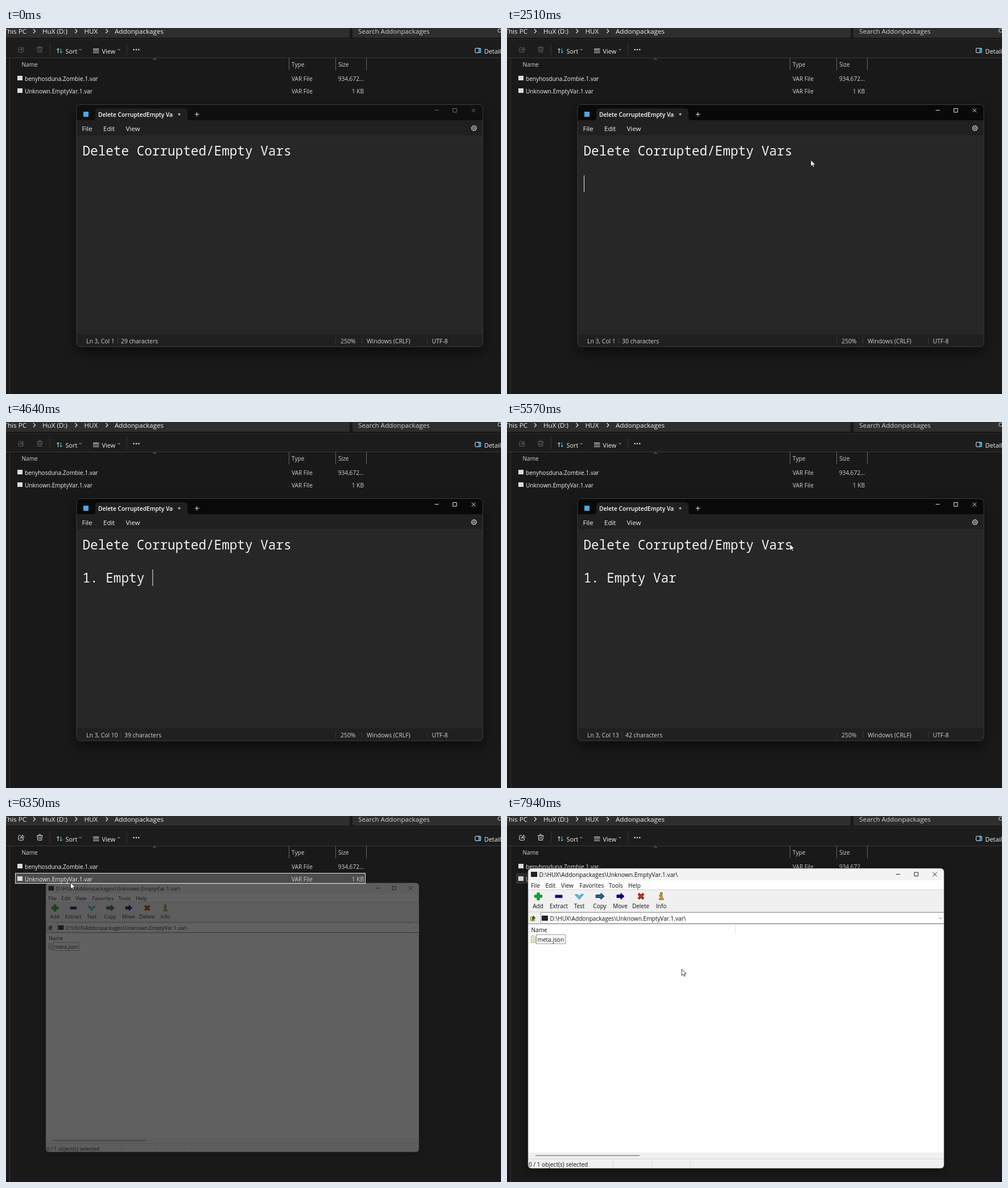
These frames come from a looping animation (870x643 px, 8 s). An HTML page:

```html
<!DOCTYPE html>
<html lang="en">
<head>
<meta charset="utf-8">
<title>Deleting empty packages</title>
<style>
html, body { margin: 0; width: 100%; height: 100%; overflow: hidden; background: #191919; }
svg { display: block; width: 870px; height: 643px; }
text { font: 10.1px "Open Sans", "Noto Sans", sans-serif; white-space: pre; }
.dark text { fill: #f2f2f2; }
.dark .soft { fill: #d2d2d2; }
.light text { fill: #111; }
.path text { font-size: 11.65px; }
.bar text { font-size: 10.9px; }
.menu text { font-size: 11.5px; }
.status text { font-size: 10.4px; }
.dark .tab { font-size: 10.2px; font-weight: 600; fill: #fff; }
.note { font: 22.67px "Noto Sans Mono", "DejaVu Sans Mono", monospace; }
.line { fill: none; stroke: #e6e6e6; }
.ink { fill: none; stroke: #222; }
.tools text { font-size: 10px; text-anchor: middle; }
#pad { filter: drop-shadow(0 9px 11px rgba(0, 0, 0, .5)); }
#zip { filter: drop-shadow(0 5px 9px rgba(0, 0, 0, .4)); }
</style>
</head>
<body>
<svg viewBox="0 0 870 643">
<defs>
  <clipPath id="padClip"><rect x="124" y="134" width="714" height="426" rx="7"/></clipPath>
  <clipPath id="zipClip"><rect x="37" y="92" width="731" height="527" rx="6"/></clipPath>
  <clipPath id="tabClip"><rect x="160" y="142" width="134" height="20"/></clipPath>
  <path id="arrow" d="M-6 -2.5H1V-5.5L7 0 1 5.5V2.5H-6Z"/>
</defs>

<g class="dark" id="explorer">
  <rect width="870" height="643" fill="#191919"/>
  <rect y="21" width="870" height="32" fill="#1c1c1c"/>
  <path d="M0 -4H604V14Q604 17 601 17H0ZM609 -4H870V17H612Q609 17 609 14Z" fill="#2e2e2e"/>
  <path d="M0 20.5H870" stroke="#292929"/>
  <path d="M0 52.5H870" stroke="#3a3a3a"/>
  <path d="M6.5 53V643" stroke="#363636"/>
  <g class="path">
    <text x="36" y="9.5" text-anchor="end">This PC</text>
    <text x="64" y="9.5">HuX (D:)</text>
    <text x="137.5" y="9.5">HUX</text>
    <text x="191" y="9.5">Addonpackages</text>
    <text x="619" y="9.5" class="soft">Search Addonpackages</text>
  </g>
  <path class="line" d="M48 2 51.5 5.5 48 9M121.5 2 125 5.5 121.5 9M175.500 2 179 5.5 175.500 9" stroke-width="1.2"/>
  <circle class="line" cx="867.5" cy="4.500" r="3"/>
  <g id="actions" fill="none">
    <path d="M26 34H23.500Q22 34 22 35.500V41Q22 42.500 23.500 42.500H29Q30.500 42.500 30.500 41V39.500M25 39.500Q25.500 36 28.500 36V33.500L32 36.500 28.500 39.500V37.500Q26 37.500 25 39.500Z"/>
    <path d="M54 34.500H64.500M57.500 34Q57.500 32 59.250 32T61 34M55 34.500 56 42.500H62.500L63.500 34.500M58 36.500V40.500M60.500 36.500V40.500"/>
  </g>
  <path d="M77.500 27V48M212.500 27V48" stroke="#333"/>
  <path class="line" d="M91.500 44V36M89 38.500 91.500 36 94 38.500"/>
  <path d="M96.500 36V44M94.500 41.500 96.500 44 99.500 41" fill="none" stroke="#5ab8ee"/>
  <path class="line" d="M153 36.500H163.500M153 38.500H163.500M153 41H163.500M153 43.500H163.500" stroke-width=".9"/>
  <path class="line" d="M128.500 37 130.500 39 132.500 37M196.500 37 198.500 39 200.500 37" stroke-width=".9"/>
  <g class="bar">
    <text x="104.500" y="44.500">Sort</text>
    <text x="168.500" y="44.500">View</text>
    <text x="840.500" y="44.500">Details</text>
  </g>
  <g fill="#eee"><circle cx="224.700" cy="38" r="1.200"/><circle cx="229" cy="38" r="1.200"/><circle cx="233.300" cy="38" r="1.200"/></g>
  <rect class="line" x="824.500" y="35.500" width="10" height="8" rx="1.500"/>
  <path d="M831 36H833.500Q834.500 36 834.500 37V42Q834.500 43.500 833.500 43.500H831Z" fill="#2d83c0" stroke="#62c1f5"/>
  <path d="M258.500 56 261 53.500 263.500 56" fill="none" stroke="#999"/>
  <path d="M497.500 53V74M579.500 53V74M633.500 53V74" stroke="#666"/>
  <text class="soft" x="27.500" y="68">Name</text>
  <text class="soft" x="502" y="68">Type</text>
  <text class="soft" x="584" y="68">Size</text>
  <rect id="row" x="16.500" y="100.500" width="615" height="18"/>
  <rect x="20" y="84" width="9" height="8" fill="#ddd"/>
  <rect x="20" y="106" width="9" height="8" fill="#ddd"/>
  <text x="33" y="92.500">benyhosduna.Zombie.1.var</text>
  <text x="33" y="114.500">Unknown.EmptyVar.1.var</text>
  <g>
    <text class="soft" x="502" y="92.500">VAR File</text>
    <text class="soft" x="502" y="114.500">VAR File</text>
    <text class="soft" x="629" y="92.500" text-anchor="end">934,672...</text>
    <text class="soft" x="629" y="114.500" text-anchor="end">1 KB</text>
  </g>
</g>

<g class="dark" id="pad">
  <g clip-path="url(#padClip)">
    <rect id="padTop" x="124" y="134" width="714" height="30"/>
    <path d="M153 162Q157 162 157 158V147Q157 141 163 141H313Q319 141 319 147V158Q319 162 323 162Z" fill="#202020"/>
    <rect x="124" y="162" width="714" height="27" fill="#202020"/>
    <rect x="124" y="189" width="714" height="349" fill="#272727"/>
    <rect x="124" y="538" width="714" height="22" fill="#202020"/>
    <path d="M124 189.500H838" stroke="#2c2c2c"/>
  </g>
  <rect x="124" y="134.500" width="714" height="425.500" rx="7" fill="none" stroke="#3d3d3d"/>
  <rect x="136" y="147" width="9" height="9" fill="#49a9e8"/>
  <g clip-path="url(#tabClip)"><text class="tab" x="162" y="156">Delete CorruptedEmpty Vars</text></g>
  <circle cx="304.500" cy="151.500" r="2" fill="#aaa"/>
  <path class="line" d="M332 151.500H339.500M335.500 148V155.500"/>
  <path id="padButtons" fill="none" d="M753.500 144.500H760.500M785.500 141.500H792V148H785.500ZM818.500 141.500 825 148M825 141.500 818.500 148"/>
  <g class="menu">
    <text x="133.500" y="181">File</text>
    <text x="171" y="181">Edit</text>
    <text x="210.500" y="181">View</text>
  </g>
  <g class="line"><circle cx="822.500" cy="176" r="1.500"/><circle cx="822.500" cy="176" r="3.900"/><circle cx="822.500" cy="176" r="4.600" stroke-dasharray="1.800 1.810"/></g>
  <text class="note" x="134.500" y="223.500">Delete Corrupted/Empty Vars</text>
  <text class="note" id="typed" x="134.500" y="282"></text>
  <path id="caret" d="M135.500 259V288" stroke="#eee"/>
  <g class="status">
    <text id="place" class="soft" x="141" y="554"></text>
    <g id="count">
      <path d="M196.500 544V555" stroke="#3a3a3a"/>
      <text id="chars" class="soft" x="202" y="554"></text>
    </g>
    <path d="M579.500 544V555M625.500 544V555M740.500 544V555" stroke="#3a3a3a"/>
    <text class="soft" x="588" y="554">250%</text>
    <text class="soft" x="634" y="554">Windows (CRLF)</text>
    <text class="soft" x="748.500" y="554">UTF-8</text>
  </g>
</g>

<g class="light" id="zip">
  <g clip-path="url(#zipClip)">
    <rect x="37" y="92" width="731" height="527" fill="#fff"/>
    <rect x="37" y="92" width="731" height="21" fill="#f3f3f3"/>
    <rect x="37" y="129" width="731" height="61" fill="#f0f0f0"/>
    <rect x="37" y="591" width="731" height="28" fill="#f0f0f0"/>
    <path d="M37 129.500H768M37 168.500H768M37 602.500H768" stroke="#d5d5d5"/>
    <path d="M186.500 604V619M254.500 604V619M322.500 604V619" stroke="#dcdcdc"/>
    <rect x="59.500" y="169.500" width="710" height="19.500" fill="#fff" stroke="#999"/>
    <path d="M37 189.500H768" stroke="#8a8a8a"/>
  </g>
  <rect x="42" y="98" width="11" height="9" fill="#222"/>
  <rect x="61" y="175" width="11" height="9" fill="#222"/>
  <text x="56.500" y="106.500" style="font-size:10.3px">D:\HUX\Addonpackages\Unknown.EmptyVar.1.var\</text>
  <text x="75.500" y="184">D:\HUX\Addonpackages\Unknown.EmptyVar.1.var\</text>
  <path class="ink" d="M683.500 102.500H691M716 99H722.500V105.500H716ZM748.500 99 755.500 106M755.500 99 748.500 106"/>
  <path d="M759.500 178.500 762 181 764.500 178.500" fill="none" stroke="#777"/>
  <text x="42" y="125.500">File</text><text x="67.500" y="125.500">Edit</text><text x="95" y="125.500">View</text>
  <text x="127.500" y="125.500">Favorites</text><text x="179" y="125.500">Tools</text><text x="213" y="125.500">Help</text>
  <rect id="copyHover" x="146" y="131" width="35" height="36" fill="#e3f0fb"/>
  <g class="tools">
    <text x="54.500" y="161.500">Add</text><text x="91" y="161.500">Extract</text><text x="127" y="161.500">Test</text>
    <text x="163" y="161.500">Copy</text><text x="199" y="161.500">Move</text><text x="235" y="161.500">Delete</text><text x="271" y="161.500">Info</text>
  </g>
  <path d="M53 135H57V139H61.500V143H57V147.500H53V143H48.500V139H53Z" fill="#0cb020" stroke="#063"/>
  <rect x="85" y="139" width="12" height="4.500" fill="#000098" stroke="#224"/>
  <path d="M119.500 138H124L127 141 130.500 137.500H134.500L127 146.500Z" fill="#49c8e8" stroke="#2b6a90" stroke-width=".8"/>
  <use href="#arrow" x="164" y="141" fill="#166c9c" stroke="#123"/>
  <path d="M156.500 138V144" stroke="#123" stroke-width="1.500"/>
  <use href="#arrow" x="199" y="141" fill="#000098" stroke="#113"/>
  <path d="M231 136.500 240 145.500M240 136.500 231 145.500" stroke="#501008" stroke-width="4"/>
  <path d="M231 136.500 240 145.500M240 136.500 231 145.500" stroke="#e03018" stroke-width="2.400"/>
  <path d="M269.500 134.500H273V137.500H269.500ZM268 139H273V145H275V147H267.500V145H269.500V141H268Z" fill="#e8ab20" stroke="#5c4108" stroke-width=".8"/>
  <path d="M41 177H44L45 178H49V184H41Z" fill="#eac545" stroke="#947515" stroke-width=".6"/>
  <path d="M43.500 183H46.500V178M44 179.500 46.500 175.500 49.500 179.500Z" fill="#265" stroke="#264a1c"/>
  <rect id="nameHover" x="38" y="191" width="364" height="17" fill="#d9ebf9"/>
  <path d="M401.500 191V208" stroke="#e2e2e2"/>
  <text x="42.500" y="204">Name</text>
  <path id="doc" d="M42.500 210.500H48L50.500 213V222.500H42.500Z" stroke="#999" stroke-width=".8"/>
  <path d="M44 214.500H48.500M44 217H49M44 219.500H49" stroke="#aaa" stroke-width=".7"/>
  <rect x="51.500" y="208.500" width="51" height="16" fill="none" stroke="#999"/>
  <text x="53.500" y="220.500">meta.json</text>
  <path d="M50 596.500H233" stroke="#858585" stroke-width="1.500"/>
  <text x="38" y="616">0 / 1 object(s) selected</text>
  <rect x="37" y="92" width="731" height="527" rx="6" fill="none" stroke="#777" stroke-opacity=".6"/>
</g>

<path id="cursor" d="M0 0V11.300L2.700 8.800 4.500 12.700 6.200 12 4.500 8.200H8Z" fill="#fff" stroke="#111" stroke-width=".8"/>
</svg>
<script>
const LOOP = 8000, BLINK = 530, PITCH = 13.6;
const LINE = "1. Empty Var";
const KEYS = [3040, 3300, 3370, 3640, 3980, 4180, 4380, 4440, 4640, 4710, 4910, 5040];
// time, x, y
const MOVES = [
  [300, 640, 430], [970, 560, 300], [1710, 537, 204], [1980, 534, 232],
  [5500, 534, 232], [5710, 425, 180], [5990, 114, 121], [6280, 113.5, 117],
  [6380, 113.5, 117], [6490, 165, 150], [6560, 207, 215],
  [6850, 140, 245], [7190, 90, 215], [7400, 130, 225], [7650, 217, 280], [7940, 307, 269]
];
const el = {};
document.querySelectorAll("[id]").forEach(n => el[n.id] = n);

const clamp = v => Math.max(0, Math.min(1, v));
const between = (t, a, b) => t >= a && t < b;
const show = (node, on) => node.setAttribute("visibility", on ? "visible" : "hidden");
const set = (node, attrs) => { for (const k in attrs) node.setAttribute(k, attrs[k]); };
const grey = v => `rgb(${v},${v},${v})`;

function position(t) {
  const i = MOVES.findIndex(m => m[0] > t);
  if (i === 0) return MOVES[0].slice(1);
  if (i < 0) return MOVES[MOVES.length - 1].slice(1);
  const [t0, x0, y0] = MOVES[i - 1], [t1, x1, y1] = MOVES[i];
  const k = (t - t0) / (t1 - t0);
  return [x0 + (x1 - x0) * k, y0 + (y1 - y0) * k];
}

function drawPad(t) {
  const n = KEYS.filter(k => k <= t).length;
  const focus = clamp((t - 130) / 200);
  const lastKey = n ? KEYS[n - 1] : 2510;
  el.pad.style.display = t < 6130 ? "" : "none";
  set(el.padTop, { fill: grey(Math.round(15 - 6 * focus)) });
  set(el.padButtons, { stroke: grey(Math.round(115 + 120 * focus)) });
  el.typed.textContent = LINE.slice(0, n);
  el.place.textContent = `Ln 3, Col ${n + 1}`;
  el.chars.textContent = `${(t < 970 ? 29 : 30) + n} characters`;
  set(el.count, { transform: `translate(${n > 8 ? 6 : 0})` });
  set(el.caret, { transform: `translate(${n * PITCH})` });
  show(el.caret, Math.floor((t - lastKey) / BLINK) % 2 === 0);
}

function drawExplorer(t) {
  const picked = t >= 6130, active = t < 6420;
  set(el.actions, { stroke: picked ? "#dce8f0" : "#646464" });
  set(el.row, { fill: active ? "#4d4d4d" : "#303030", stroke: active ? "#e0e0e0" : "#303030" });
  show(el.row, picked);
}

function drawZip(t) {
  const p = clamp((t - 6296) / 175), s = .85 + .15 * p;
  el.zip.style.display = p > 0 ? "" : "none";
  set(el.zip, { opacity: p, transform: `translate(358 340) scale(${s}) translate(-358 -340)` });
  show(el.copyHover, between(t, 6480, 6630));
  show(el.nameHover, between(t, 6520, 6700));
  set(el.doc, { fill: t < 7190 ? "#e4e4e4" : "#f2efc4" });
}

function frame() {
  const t = performance.now() % LOOP;
  drawExplorer(t);
  drawPad(t);
  drawZip(t);
  set(el.cursor, { transform: `translate(${position(t)})` });
  show(el.cursor, between(t, 300, 4180) || t >= 5500);
  requestAnimationFrame(frame);
}
frame();
</script>
</body>
</html>
```
